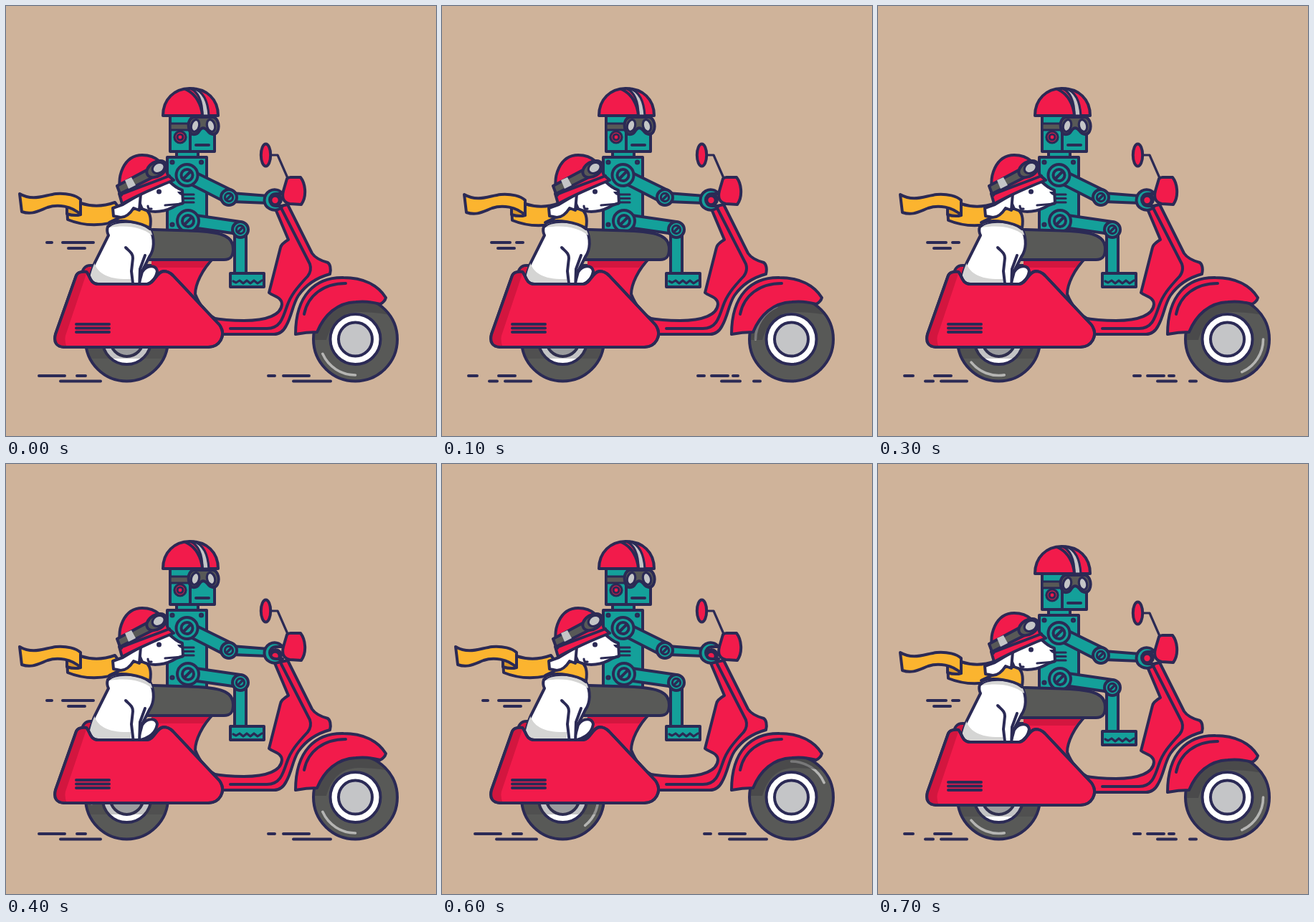
Recreate the animation shown at these times as an HTML page. Size 600x600 px, loop 850 ms.

```html
<!DOCTYPE html>
<html lang="en">
<head>
<meta charset="utf-8">
<title>Scooter ride</title>
<style>
html, body { margin: 0; width: 100%; height: 100%; overflow: hidden; background: #cfb39a; }
svg { display: block; width: 100vw; height: 100vh; }
.ink { stroke: #2b2a55; stroke-width: 4; stroke-linejoin: round; stroke-linecap: round; fill: none; }
.thin { stroke-width: 3.2; }
.red { fill: #f21b4b; }
.deep { fill: #d3163f; stroke: none; }
.teal { fill: #14a09a; }
.gray { fill: #585957; }
.light { fill: #c4c5c7; }
.white { fill: #fff; }
.gold { fill: #fbb42f; }
.shade { fill: #3d3d40; fill-opacity: .5; stroke: none; }
.soft { fill: #d5d5d4; stroke: none; }
.dot { fill: #2b2a55; stroke: none; }
.shine { stroke: #b5b5b3; stroke-width: 3.6; }
</style>
</head>
<body>
<svg viewBox="0 0 600 600" class="ink">
  <defs>
    <path id="panelShape" d="M98 376Q101 370 112 371C117 374 116 388 129 388H197C207 387 210 371 220 370Q227 370 233 376L298 445C308 460 298 476 282 476H81Q65 475 69 458Z"/>
    <clipPath id="rearTyre"><circle cx="168.5" cy="466" r="56"/></clipPath>
    <clipPath id="frontTyre"><circle cx="487.5" cy="465" r="57"/></clipPath>
    <clipPath id="panelClip"><use href="#panelShape"/></clipPath>
    <clipPath id="bodyClip"><use href="#dogBody"/></clipPath>
    <g id="joint">
      <circle class="teal" r="15"/>
      <circle r="8"/>
      <path d="M-4 4 4 -4"/>
    </g>
    <g id="smallJoint">
      <circle class="teal" r="11"/>
      <circle class="thin" r="5.6"/>
      <path class="thin" d="M-3 3 3 -3"/>
    </g>
  </defs>

  <path id="speed"/>

  <g id="rear">
    <circle class="gray" cx="168.5" cy="466" r="57.5"/>
    <path class="shine" id="rearShine"/>
    <circle class="white" cx="168.5" cy="466" r="34"/>
    <circle class="light" cx="168.5" cy="466" r="23"/>
    <g clip-path="url(#rearTyre)"><path class="shade bike" style="fill-opacity:.3" d="M105 400H235V492H105Z"/></g>
  </g>

  <g id="front">
    <circle class="gray" cx="487.5" cy="465" r="58.5"/>
    <path class="shine" id="frontShine"/>
    <g clip-path="url(#frontTyre)"><path class="shade bike" d="M424 400H540V432C520 428 505 427 491 427C468 428 455 440 447 466H424Z"/></g>
    <circle class="white" cx="487.5" cy="465" r="35"/>
    <circle class="light" cx="487.5" cy="465" r="23.5"/>
  </g>

  <g class="robot">
    <path class="teal" d="M238 201H268V212H238Z"/>
    <path class="teal" d="M225 211H280V330H225Z"/>
    <g class="thin">
      <circle cx="232" cy="218" r="2"/><circle cx="272.5" cy="218" r="2"/><circle cx="232" cy="305" r="2"/>
    </g>
    <path d="M246 263H262M246 268.5H262M246 274H262" class="thin"/>
    <path class="teal" d="M229 150H291V203H229Z"/>
    <path d="M257 176V203M265 194H283"/>
    <path class="gray thin" d="M229 164H258V173H229Z"/>
    <circle class="red thin" cx="243" cy="183" r="8"/>
    <circle class="red thin" cx="243" cy="183" r="4"/>
    <path class="gray" d="M262 155H289C297 157 298 169 295 175C292 181 285 180 281 174C277 169 273 169 270 174C266 181 258 181 256 174C253 165 255 157 262 155Z"/>
    <g class="light thin">
      <ellipse cx="264" cy="167" rx="5.5" ry="8.5" transform="rotate(15 264 167)"/>
      <ellipse cx="286" cy="167" rx="5.5" ry="8.5" transform="rotate(-15 286 167)"/>
    </g>
    <path class="red" d="M219 153C219 130 235 115 257 115C280 115 296 130 296 153Z"/>
    <path class="light thin" d="M257 115C271 121 274 137 274 153H283C282 135 277 120 262 115Z"/>
    <path d="M250 116C265 122 273 138 274 153"/>
    <path class="teal" d="M258 291 327 301 323 318 260 309Z"/>
    <use href="#joint" x="254" y="300"/>
  </g>

  <g class="bike">
    <path d="M370 208H379L393 240" class="thin"/>
    <ellipse class="red" cx="362.5" cy="208" rx="6.7" ry="15.5"/>
    <path class="red" d="M375 281 394 326Q384 332 383 337L367 400C373 405 385 406 385 416C384 431 364 439 332 439C308 439 296 437 286 435L296 458H374C382 458 387 454 391 446C399 432 400 416 408 404C417 391 430 380 452 374C454 366 452 360 449 358C438 355 431 351 427 345L393 277Z"/>
    <path d="M384 282 424 360Q427 369 421 377C406 393 397 404 392 419C386 437 382 450 364 450H313"/>
    <path class="red" d="M392 241Q394 239 397 239H411C418 248 420 266 412 277L396 276C386 274 385 266 387 258Z"/>
    <path class="red" d="M105 378C106 368 110 362 118 362H205V350H291C273 368 264 389 264 402C270 417 280 429 290 435L302 458H200Z"/>
    <path class="deep" d="M108 374C108 368 112 364 118 364V374ZM203 355H284L275 365H203Z"/>
    <path class="gray" d="M190 312H206L268 314C303 316 317 322 317 339C317 350 313 354 304 354H180Z"/>
    <path class="red" d="M404 458C404 403 432 378 471 379C498 379 519 389 530 407C529 411 526 414 522 416C512 413 500 412 488 413C462 414 444 431 434 455C424 455 414 456 404 458Z"/>
    <path d="M416 430C421 404 443 387 474 387"/>
    <circle class="dot" cx="376" cy="270" r="10"/>
    <circle class="red" style="stroke:none" cx="375.5" cy="271" r="4.2"/>
  </g>

  <g class="robot">
    <path class="teal" d="M319 318H335V374H319Z"/>
    <use href="#smallJoint" x="327" y="312"/>
    <path class="teal" d="M313 373H360V392H313Z"/>
    <path class="thin" d="M317 384 321 386 326 383 331 387 336 383 341 387 346 383 351 387 357 383"/>
    <path class="teal" d="M264 232 317 258 303 272 260 250Z"/>
    <use href="#joint" x="252.5" y="236"/>
    <path class="teal" d="M315 261 366 265V275L315 273Z"/>
    <path class="teal" d="M386 262C382 256 374 255 368 258C358 264 358 278 368 283C374 286 382 285 386 279H377C365 279 365 262 377 262Z"/>
    <use href="#smallJoint" x="311" y="267"/>
  </g>

  <g class="robot">
    <g id="scarf" class="gold">
      <path d="M85 279C92 276 98 275 104 275C122 281 138 279 152 274L168 296C140 307 113 309 86 298Z"/>
      <path d="M85 278C94 280 99 285 104 291C98 293 91 292 85 290Z" style="fill:#d9972b"/>
      <path d="M19 262C38 273 53 264 70 262C85 261 98 264 104 270V291C92 279 72 276 58 281C45 286 36 292 22 287Z"/>
    </g>

    <path class="white" id="dogBody" d="M142 308C152 298 187 298 201 311C208 325 207 340 200 350L190 370V402H112C116 382 119 368 124 358L143 320Q140 314 142 308Z"/>
    <g clip-path="url(#bodyClip)">
      <path class="soft" d="M122 355C127 374 143 382 174 381V402H110ZM147 300C166 300 190 303 204 315V320C190 309 170 305 145 309Z"/>
      <path d="M142 308C152 298 187 298 201 311"/>
    </g>
    <path class="white" d="M190 371C197 361 209 361 211 370C209 382 201 389 184 393Z"/>
    <path class="white" style="stroke:none" d="M177 350H194L187 367 186 396H178Z"/>
    <path d="M167 337C173 343 177 345 177 352L175 370 178 396M194 348 187 367 186 396"/>
    <path class="gold" d="M144 302C157 296 167 292 178 283H194C202 288 203 298 201 310C187 302 164 297 144 302Z"/>

    <path class="white" d="M180 260 225 242C232 249 239 255 246 257L247 275 238 278C224 287 205 290 190 283Z"/>
    <path class="dot" d="M239 259H247V264Q242 265 239 259Z"/>
    <path d="M222 278 246 276M198 279Q198 284 203 283" class="thin"/>
    <circle class="dot" cx="213.5" cy="259" r="3.5"/>
    <path class="white" d="M188 262 186 285 178 282C173 290 168 295 160 295L150 293 149 282 163 277Z"/>
    <path class="red" d="M161 264C153 237 165 208 190 208C211 208 222 222 226 236L234 243C209 253 184 264 162 276L158 262Z"/>
    <path d="M160 263C182 254 203 247 228 237"/>
    <path class="gray" d="M155 251 200 227 205 239 159 262Z"/>
    <path class="light" style="stroke:none" d="M166 243 175 239 181 250 171 255Z"/>
    <g transform="rotate(-32 211 227)">
      <ellipse class="gray" cx="210" cy="227" rx="15" ry="10"/>
      <ellipse class="light thin" cx="213" cy="227" rx="9" ry="7"/>
    </g>
  </g>

  <g class="bike">
    <use href="#panelShape" class="red"/>
    <g clip-path="url(#panelClip)"><path class="deep" d="M92 365H115L83 460Q81 470 87 480H60Z"/></g>
    <use href="#panelShape"/>
    <path d="M98 444H144M98 449.5H144M98 455H144"/>
  </g>
</svg>
<script>
const STEP = 100, LOOP = 850, LAST = 7;

// Each row: y, then start and end of every dash
const dashes = [
  [[330, 57, 64, 79, 122], [338, 87, 110], [516, 46, 82, 99, 111, 366, 375, 387, 423], [523.5, 76, 132, 401, 453]],
  [[330, 69, 95, 104, 113], [338, 78, 101], [516, 37, 49, 79, 102, 357, 366, 376, 399, 406, 413],
   [523.5, 66, 77, 88, 124, 390, 416, 435, 444]]
];

const byId = id => document.getElementById(id);
const shift = (el, x, y) => el.setAttribute("transform", `translate(${x} ${y})`);
const shiftAll = (name, y) => document.querySelectorAll("." + name).forEach(el => shift(el, 0, y));

function dashPath(rows) {
  let d = "";
  for (const [y, ...xs] of rows)
    for (let i = 0; i < xs.length; i += 2) d += `M${xs[i]} ${y}H${xs[i + 1]}`;
  return d;
}

function arc(cx, cy, r, from, to) {
  const at = deg => {
    const a = deg * Math.PI / 180;
    return `${cx + r * Math.cos(a)} ${cy + r * Math.sin(a)}`;
  };
  return `M${at(from)}A${r} ${r} 0 0 1 ${at(to)}`;
}

function draw(ms) {
  const i = Math.min(LAST, Math.floor((ms % LOOP) / STEP));
  const alt = i % 2, turn = 90 * (i + 1);
  // One smooth wheel turn, then one turn over bumps
  const up = i >= 4 && !alt ? 1 : 0;
  shiftAll("bike", -3 * up);
  shiftAll("robot", -7 * up);
  shift(byId("scarf"), 12 * alt, alt);
  byId("speed").setAttribute("d", dashPath(dashes[alt]));
  byId("frontShine").setAttribute("d", arc(487.5, 465, 50, turn, turn + 66));
  byId("rearShine").setAttribute("d", arc(168.5, 466, 49.5, turn + 81, turn + 141));
}

let start;
function tick(now) {
  start ??= now;
  draw(now - start);
  requestAnimationFrame(tick);
}
draw(0);
requestAnimationFrame(tick);
</script>
</body>
</html>
```
